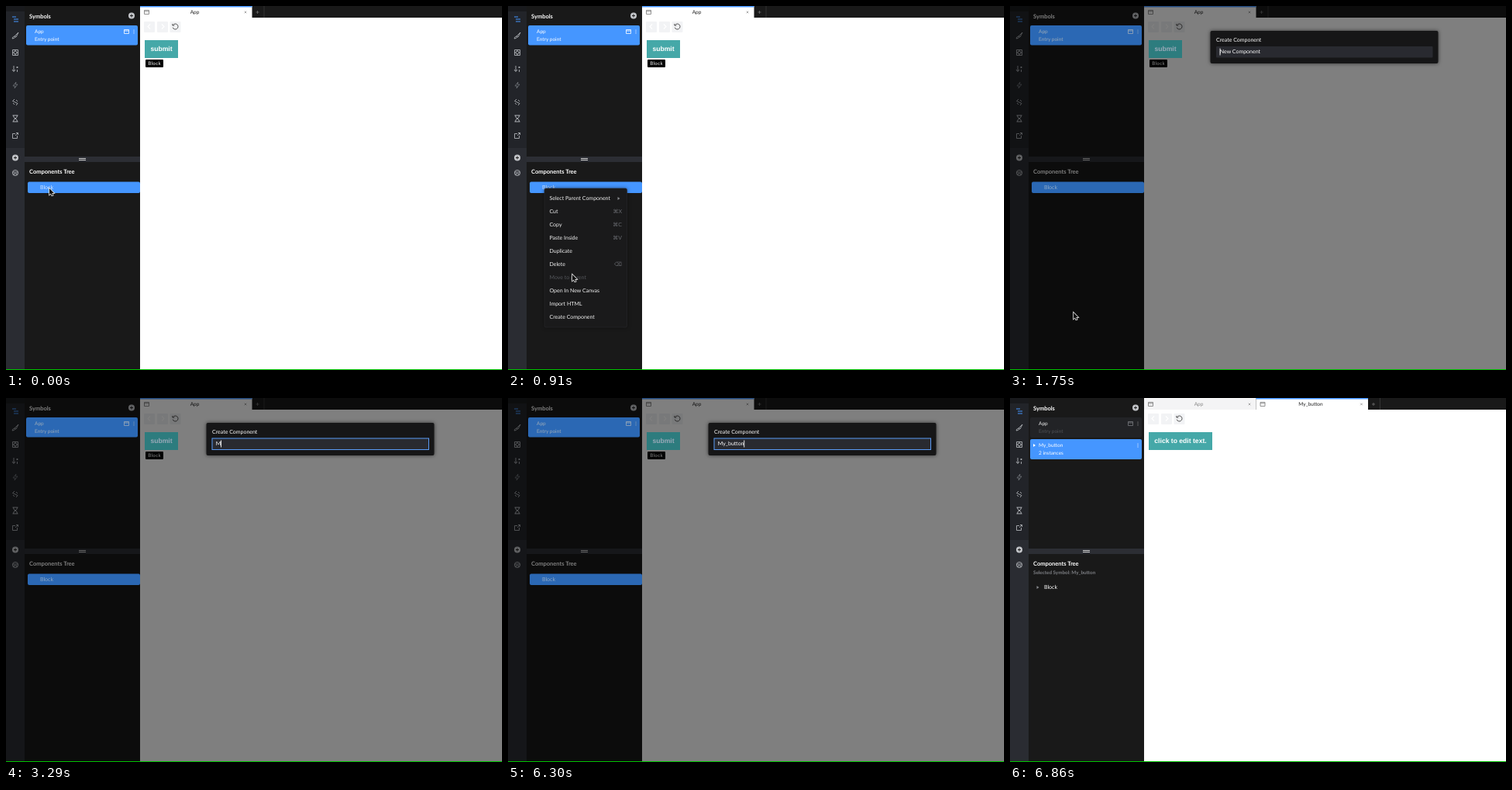
Write an HTML page with a canvas that moves like this. It is 640x469 px and loops after 7000 ms.

```html
<!DOCTYPE html>
<html lang="en">
<head>
<meta charset="utf-8">
<title>Create a component</title>
<style>
  html, body { margin: 0; width: 100%; height: 100%; overflow: hidden; background: #fff; }
  canvas { display: block; }
</style>
</head>
<body>
<canvas id="stage" width="640" height="469"></canvas>
<script>
const ctx = document.getElementById('stage').getContext('2d');
ctx.textRendering = 'geometricPrecision';

const LOOP = 7000;
const MENU_OPEN = 350, CLICK = 1610, DIALOG = 1750, FOCUS = 2450, CLEAR = 3010, DONE = 6370;
const NAME = 'My_button';
const KEY_TIMES = [3290, 3430, 3850, 4060, 4200, 4410, 4690, 4830, 5110];
const POINTER = [[350, 56, 235], [840, 83, 343], [910, 83, 346], [1470, 82, 395]];
const MENU = [
  ['Select Parent Component', '▸'], ['Cut', '⌘X'], ['Copy', '⌘C'], ['Paste Inside', '⌘V'],
  ['Duplicate'], ['Delete', '⌫'], ['Move to parent'], ['Open In New Canvas'],
  ['Import HTML'], ['Create Component']
];
const BLUE = '#4596ff', TEAL = '#45a8a8', PANEL = '#191919';
const BRIGHT = { blue: BLUE, teal: TEAL, text: '#fff', row: '#d3e5ff', tag: '#000', tagText: '#fff' };
const DIM = { blue: '#2b68b4', teal: '#2d7c7e', text: '#9aa9b8', row: '#8fa9c6', tag: '#000', tagText: '#888' };

function box(x, y, w, h, fill, radius = 0) {
  ctx.fillStyle = fill;
  ctx.beginPath();
  ctx.roundRect(x, y, w, h, radius);
  ctx.fill();
}

// y is the optical middle of the line
function text(str, x, y, color = '#fff', size = 7, { weight = 400, family = 'Lato', align = 'left' } = {}) {
  ctx.font = `${weight} ${size}px ${family}, "DejaVu Sans", sans-serif`;
  ctx.textAlign = align;
  ctx.fillStyle = color;
  ctx.fillText(str, x, y + size * 0.35);
}

function line(d, x, y, color, width = 1) {
  ctx.save();
  ctx.translate(x, y);
  ctx.strokeStyle = color;
  ctx.lineWidth = width;
  ctx.stroke(new Path2D(d));
  ctx.restore();
}

function shape(d, x, y, color) {
  ctx.save();
  ctx.translate(x, y);
  ctx.fillStyle = color;
  ctx.fill(new Path2D(d));
  ctx.restore();
}

function ring(x, y, r, color, width = 1) {
  ctx.strokeStyle = color;
  ctx.lineWidth = width;
  ctx.beginPath();
  ctx.arc(x, y, r, 0, Math.PI * 2);
  ctx.stroke();
}

const plusDisc = (x, y) => {
  box(x - 4, y - 4, 8, 8, '#c4c6ca', 4);
  line('M-2 0H2M0 -2V2', x, y, '#222');
};
const windowIcon = (x, y, color) => line('M-3 -2.5H3V2.5H-3ZM-3 -1H3', x, y, color, 0.8);
const dots = (x, y, color) => [-2, 0, 2].forEach(dy => box(x - 0.6, y + dy - 0.6, 1.2, 1.2, color, 0.6));
const triangle = (x, y, color) => shape('M-1.5 -2L1.5 0L-1.5 2Z', x, y, color);

function rail() {
  box(0, 0, 24, 469, '#2a2c32');
  box(0, 0, 24, 183, '#222429');
  box(0, 0, 24, 7, '#191a1d');
  const grey = '#aeb1b6';
  line('M-4 -3H1M-2 0H4M-2 3H4', 12, 17, BLUE, 1.2);
  line('M4 -4L-1 1L1 2ZM-1 1Q-3 1 -4 4Q-1 4 0 2', 12, 38, grey, 0.9);
  line('M-3.5 -3.5H3.5V3.5H-3.5ZM-3.5 0H-2M2 0H3.5M0 -3.5V-2M0 2V3.5', 12, 60, grey, 0.9);
  ring(12, 60, 1.9, grey, 0.9);
  line('M-2 -4V3M-4 1L-2 3.5L0 1M2.5 4V1M2.5 -1V-3M1.2 -2H3.8', 12, 81, grey, 0.9);
  line('M1 -4L-3 1H0L-1 4L3 -1H0Z', 12, 102, '#73767c', 0.8);
  line('M-1 -4L-3.5 -1.5L3 1.5L1 4M1 -3L3 -1M-3 1L-1 3', 12, 124, grey, 0.9);
  line('M-3.5 -4H3.5M-3.5 4H3.5M-2.5 -4Q-2.5 -1 0 0Q2.5 1 2.5 4M2.5 -4Q2.5 -1 0 0Q-2.5 1 -2.5 4', 12, 145, grey);
  line('M0 -2.5H-3.5V3.5H2.5V0M0 0L3.5 -3.5M1 -3.5H3.5V-1', 12, 167, grey, 0.9);
  plusDisc(12, 195.5);
  ring(12, 215, 3.6, grey, 0.9);
  line('M-3.5 -1H3.5M-2 3V1H2V3', 12, 215, grey, 0.9);
}

function sidePanel(done) {
  box(24, 0, 149, 469, PANEL);
  box(24, 194, 149, 7, '#2c2e34');
  box(94, 196, 9, 1, '#d0d0d0');
  box(94, 198, 9, 1, '#d0d0d0');
  text('Symbols', 30, 13, '#fff', 7.5, { weight: 700 });
  plusDisc(162, 12.5);
  text('Components Tree', 30, 213, '#fff', 7.5, { weight: 700 });
  if (!done) return;
  box(26, 25, 144, 26, '#222326', 2);
  text('App', 37, 33, '#eee', 6.5);
  text('Entry point', 37, 43, '#505257', 6.5);
  windowIcon(155.5, 33, '#77797e');
  dots(165, 33, '#999');
  box(26, 53, 144, 26, BLUE, 2);
  triangle(31.5, 61, '#fff');
  text(NAME, 37, 61, '#fff', 6.5);
  text('2 instances', 37, 71, '#fff', 6.5);
  dots(165, 61, '#fff');
  text('Selected Symbol: ' + NAME, 30, 225, '#7d7f84', 6.3, { weight: 700 });
  triangle(36, 244, '#85878b');
  text('Block', 44, 244);
}

function tab(x, title, active) {
  box(x, 0, 144.5, 15, active ? '#fff' : '#f4f4f5');
  if (active) box(x, 0, 144.5, 1.5, BLUE);
  windowIcon(x + 8.5, 8, '#777');
  text(title, x + 70.5, 8, active ? '#222' : '#888', 6.5, { align: 'center' });
  line('M-1.3 -1.3L1.3 1.3M1.3 -1.3L-1.3 1.3', x + 136, 8, '#888', 0.7);
}

function canvasArea(done) {
  box(173, 0, 467, 469, '#fff');
  box(173, 0, 467, 15, PANEL);
  tab(173, 'App', !done);
  if (done) tab(317.5, NAME, true);
  const end = done ? 462 : 317.5;
  line('M-2 0H2M0 -2V2', end + 7, 8, '#777', 0.7);
  box(end + 15, 0, 1, 15, '#333');
  [178, 195, 211.5].forEach(x => box(x, 20, 14, 14, '#f2f3f5', 1));
  line('M1.5 -3L-1.5 0L1.5 3', 184.5, 26.5, '#fff', 1.2);
  line('M-1.5 -3L1.5 0L-1.5 3', 202.5, 26.5, '#fff', 1.2);
  line('M-3 -1.8A3.5 3.5 0 1 1 -3.3 1.2M-3.6 -3.6V-1.4H-1.2', 218.5, 26.5, '#444', 0.9);
  if (done) button('click to edit text.', 82, BRIGHT);
}

function button(label, width, tone) {
  box(179, 44, width, 23, tone.teal);
  text(label, 179 + width / 2, 55.3, tone.text, 8.6,
    { weight: 700, family: '"Liberation Sans"', align: 'center' });
}

// Everything selected while the Block is being converted
function selection(tone) {
  box(26, 25, 144, 25.5, tone.blue, 2);
  text('App', 37, 33, tone.text, 6.5);
  text('Entry point', 37, 43, tone.text, 6.5);
  windowIcon(155.5, 33, tone.text);
  dots(165, 33, tone.text);
  box(28, 226.5, 145, 14.5, tone.blue, 2);
  text('Block', 44, 233.5, tone.row);
  button('submit', 43, tone);
  box(180, 69, 23, 10, tone.tag, 1);
  ctx.letterSpacing = '0.3px';
  text('Block', 191.6, 74, tone.tagText, 6.2, { align: 'center' });
  ctx.letterSpacing = '0px';
}

function menu(pointerY) {
  ctx.save();
  ctx.shadowColor = 'rgba(0,0,0,.5)';
  ctx.shadowBlur = 5;
  box(47, 235, 106.5, 179, '#1a1a1b', 2);
  ctx.restore();
  ctx.strokeStyle = '#2a2b2e';
  ctx.lineWidth = 0.6;
  ctx.stroke();
  MENU.forEach(([label, hint], i) => {
    const y = 248 + 17 * i, disabled = label === 'Move to parent';
    if (!disabled && Math.abs(pointerY - y) < 8.5) box(47, y - 8.5, 106.5, 17, '#2b2c33');
    text(label, 53.5, y, disabled ? '#55575c' : '#f2f2f2');
    if (i === 0) triangle(143, y, '#85878b');
    else if (hint) text(hint, 147, y, '#696b70', 7, { align: 'right' });
  });
}

function dialog(t) {
  ctx.save();
  ctx.shadowColor = 'rgba(0,0,0,.6)';
  ctx.shadowBlur = 5;
  box(258.5, 32, 294, 42, '#161617', 2);
  ctx.restore();
  text('Create Component', 266, 44);
  box(266, 52, 279.5, 14.5, '#292a30', 1);
  if (t >= FOCUS) {
    ctx.strokeStyle = '#5b9bf5';
    ctx.lineWidth = 1;
    ctx.strokeRect(266, 52, 279.5, 14.5);
  }
  const typed = NAME.slice(0, KEY_TIMES.filter(k => t >= k).length);
  const value = t < CLEAR ? 'New Component' : typed;
  text(value, 270.8, 59);
  const caret = t < CLEAR ? 0 : ctx.measureText(value).width;
  box(270.6 + caret, 54.5, 0.9, 9, '#fff');
}

function pointerAt(t) {
  const next = POINTER.findIndex(p => p[0] > t);
  if (next < 1) return (next ? POINTER.at(-1) : POINTER[0]).slice(1);
  const [t0, x0, y0] = POINTER[next - 1], [t1, x1, y1] = POINTER[next];
  const k = (t - t0) / (t1 - t0), e = k * k * (3 - 2 * k);
  return [x0 + (x1 - x0) * e, y0 + (y1 - y0) * e];
}

function pointer(x, y) {
  const arrow = 'M0 0V8.3L1.9 6.6L3.2 9.4L4.6 8.8L3.4 6.1H6Z';
  line(arrow, x, y, '#fff', 1.4);
  shape(arrow, x, y, '#111');
}

function draw(t) {
  const done = t >= DONE, modal = t >= DIALOG && !done;
  const [px, py] = pointerAt(t);
  rail();
  sidePanel(done);
  canvasArea(done);
  if (!done && !modal) selection(BRIGHT);
  if (modal) {
    box(0, 0, 640, 469, 'rgba(0,0,0,.5)');
    selection(DIM);
    dialog(t);
  }
  if (t >= MENU_OPEN && t < DIALOG) menu(py);
  if (t < CLEAR) pointer(px, py);
  if (t >= CLICK && t < DIALOG) {
    ring(82.5, 396.5, 11.3, '#ddd', 0.9);
    ring(82.5, 396.5, 8.6, '#ddd', 0.9);
  }
  box(0, 468, 640, 1, '#00c000');
}

function tick(now) {
  draw(now % LOOP);
  requestAnimationFrame(tick);
}
requestAnimationFrame(tick);
</script>
</body>
</html>
```
